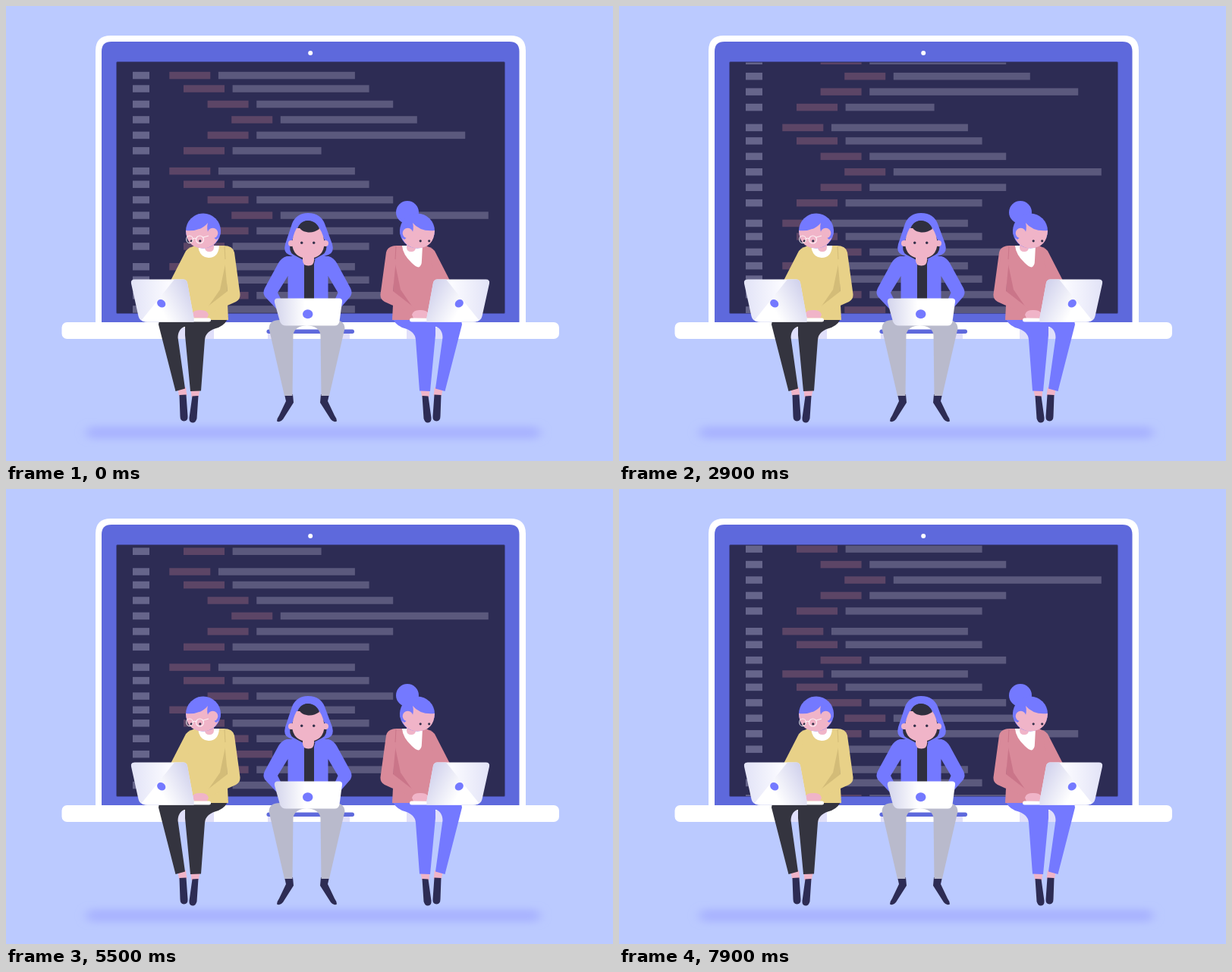
Animation of 800x600 px, one loop 8 s. Source, as an HTML page:

```html
<!DOCTYPE html>
<html lang="en">
<head>
<meta charset="utf-8">
<title>Coders</title>
<style>
  html, body { margin: 0; width: 100%; height: 100%; overflow: hidden; background: #bbcaff; }
  svg { display: block; width: 800px; height: 600px; }
</style>
</head>
<body>
<svg viewBox="0 0 800 600" xmlns="http://www.w3.org/2000/svg">
  <defs>
    <filter id="blur" x="-10%" y="-200%" width="120%" height="500%"><feGaussianBlur stdDeviation="7 5"/></filter>
    <clipPath id="screen"><rect x="146" y="74.5" width="511" height="330.5"/></clipPath>
    <linearGradient id="lidBack" x1="0" x2="1">
      <stop offset="0" stop-color="#e2e3f7"/><stop offset=".6" stop-color="#fbfbff"/><stop offset="1" stop-color="#e6e7f8"/>
    </linearGradient>
    <linearGradient id="lidShine" x1="0.1" y1="0.7" x2="1" y2="0.3">
      <stop offset=".25" stop-color="#fff"/><stop offset="1" stop-color="#cfd0ec"/>
    </linearGradient>
    <linearGradient id="lidFront" x1="0" x2="1">
      <stop offset="0" stop-color="#d3d4ec"/><stop offset=".45" stop-color="#fff"/><stop offset="1" stop-color="#fff"/>
    </linearGradient>
  </defs>

  <rect width="800" height="600" fill="#bbcaff"/>
  <rect x="106" y="554" width="598" height="17" rx="8" fill="#a9b4ff" filter="url(#blur)"/>

  <!-- big laptop -->
  <path d="M118 420V59Q118 39 138 39H665Q685 39 685 59V420Z" fill="#fff"/>
  <path d="M126 418V60Q126 47 139 47H663.500Q676.500 47 676.500 60V418Z" fill="#5e69dc"/>
  <circle cx="401.200" cy="62" r="3" fill="#fff"/>
  <rect x="145.500" y="73.500" width="512" height="332" rx="1.500" fill="#2d2c54" stroke="#454a9e" stroke-width=".8"/>
  <g clip-path="url(#screen)"><g id="code"></g></g>
  <rect x="73.500" y="417" width="655.500" height="22" rx="7" fill="#fff"/>
  <g fill="#e0dffa">
    <path d="M345 432H356V439H345ZM441 432H453V439H441Z"/>
  </g>
  <rect x="343.500" y="426.500" width="115.500" height="5.500" rx="2.700" fill="#5e69dc"/>

  <g id="left"></g>
  <g id="right" transform="translate(802 0) scale(-1 1)"></g>

  <!-- middle figure -->
  <g id="legs"></g>
  <path d="M370 330Q363 332 359 339L341 372Q338 378 341 383L356 399H440L454 383Q457 378 454 372L436 339Q432 332 425 330Z
           M371.500 356V386H362L358 378Z M424.500 356L437.500 378L434 386H424.500Z" fill="#7479ff" fill-rule="evenodd"/>
  <path d="M389 328H409L406 340V388H393V340Z" fill="#2f2f3f"/>
  <path d="M398 273C410 273 417 279 420 287L430 314Q433 325 425 328L411 333L398 337L385 333L373 328Q365 325 368 314L377 287C380 279 387 273 398 273Z" fill="#7479ff"/>
  <path d="M398 283C406 283 411 288 413 294L422 313Q424 324 417 328L404 335H392L379 328Q372 324 375 313L384 294C386 288 390 283 398 283Z" fill="#2f2f3f"/>
  <g fill="#f0b4c8">
    <path d="M391 326H406V335Q406 342.500 398.500 342.500Q391 342.500 391 335Z"/>
    <circle cx="376" cy="313" r="4"/><circle cx="421" cy="313" r="4"/>
    <path d="M383 293H413Q419 302 419.500 313Q419 332 398.500 333Q378 332 377 313Q378 302 383 293Z"/>
  </g>
  <path d="M398 283Q408 284 413 294Q404 300 396 298Q389 297 386 291Q391 283 398 283Z" fill="#2f2f3f"/>
  <g fill="#34304a"><circle cx="389.700" cy="312.300" r="1.700"/><circle cx="405.700" cy="312.300" r="1.700"/></g>
  <path d="M358 385.500H439Q443.500 385.500 443 390L439.500 416Q438.500 421.500 433 421.500H369Q363 421.500 361 416L354 391Q353 385.500 358 385.500Z" fill="url(#lidFront)"/>
  <ellipse cx="397.700" cy="406.300" rx="6.700" ry="6" fill="#7479ff"/>
</svg>
<script>
const $ = id => document.getElementById(id);
const path = (d, fill) => `<path d="${d}" fill="${fill}"/>`;
const SKIN = '#f0b4c8', BLUE = '#7479ff', NAVY = '#2d2c54';

// Seated side figure, facing left; the other one is mirrored.
function sitter(c) {
  return [
    path('M226 424H274V439H226Z', '#e0dffa'),
    // feet
    path('M226 503L237 503L238.500 514H228Z M243.500 505H256L253.500 516H244.500Z', SKIN),
    path('M228.500 513L237.500 512.500L239.500 541Q240 547 234.500 547.500Q229.500 547 229.500 541Z M245.500 514.500L253.500 514L251.500 544Q250 549.500 246 549.500Q241 549 241.500 543Z', NAVY),
    // trousers
    path('M201 420Q201 414 207 413H272V422H240Q227 423 226.500 437L236 504.500L223.500 508Z', c.legs),
    path('M236 420L240 411L293 409Q291 419 280 424Q263 428 262 440L257 507.500L243 508L236 434Z', c.legs),
    // far arm, body, near arm
    path('M254 316Q241 317 237 323L217 362V372L240 382L252 340Z', c.top),
    path('M248 316H288L293 414H240V352L243 320Z', c.top),
    path('M291 331L292 378L262 403L282 374Z', c.shade),
    path('M284 316Q299 315 301 325L308.500 380Q309 387 303 390L265 407L261 400L292 376L288 334Z', c.top),
    `<path d="M288 317L289 334" stroke="${c.shade}" fill="none"/>`,
    path(c.collar, '#fff'),
    path('M262 308H274V318Q274 324 268 324Q262 324 262 318Z', SKIN),
    // head
    c.bun ? `<circle cx="273" cy="272" r="15" fill="${BLUE}"/>` : '',
    `<circle cx="260" cy="296.500" r="23" fill="${BLUE}"/>`,
    path('M237 296Q256 298 266 286Q265 295 268 298L280 306Q274 319 260 319.500Q238 319 237 296Z', SKIN),
    path('M266 286Q264 295 267 300L277 308Q283 304 283 296Q280 284 266 286Z', BLUE),
    `<circle cx="272.500" cy="299.500" r="6.800" fill="${SKIN}"/>`,
    '<g fill="#34304a"><circle cx="244.300" cy="309.800" r="1.600"/><circle cx="255.800" cy="309.800" r="1.600"/></g>',
    c.glasses ? '<g fill="none" stroke="#fff" stroke-opacity=".8" stroke-width="1.200"><ellipse cx="242" cy="307.800" rx="4.300" ry="4.800"/><circle cx="255.500" cy="308" r="5"/><path d="M246.300 307Q248.500 305.500 250.600 307M260 305L267 303"/></g>' : '',
    // hand and small laptop
    path('M244 411Q244 401 255 401Q265 400 267 407L265 412Z', SKIN),
    '<rect x="184" y="411.500" width="86" height="5" rx="2.500" fill="#fff"/>',
    path('M169.500 360.500H233.500Q238 360.500 239 365L247.500 411V416.500H184Q176 416 174.500 409L165 366Q164 360.500 169.500 360.500Z', 'url(#lidBack)'),
    path('M222 360.500H233.500Q238 360.500 239 365L247.500 411V416.500H184Q181 416.500 178.500 414.500Z', 'url(#lidShine)'),
    `<ellipse cx="204.700" cy="392.300" rx="5.900" ry="4.900" transform="rotate(35 204.700 392.300)" fill="${BLUE}"/>`
  ].join('');
}

$('left').innerHTML = sitter({
  legs: '#34343f', top: '#e8d188', shade: '#d3bc78', glasses: true,
  collar: 'M253 316H281Q280 332 267 332Q255 332 253 316Z'
});
$('right').innerHTML = sitter({
  legs: BLUE, top: '#d98a9a', shade: '#ca7589', bun: true,
  collar: 'M253 316H280Q279 328 267 339Q262 344 258 344.500Q254 343 254 335Z'
});

const leg =
  path('M367 512L378 512L379 523L365 545Q361 550 357 547.500Q357 544 360 540L369 521Z', NAVY) +
  path('M346.500 425Q347 414 361 414H397V421Q380 422 378.500 434L377.500 514H367Z', '#b9bacc');
$('legs').innerHTML = leg + `<g transform="translate(793 0) scale(-1 1)">${leg}</g>`;

// Code listing: [indent level, bar width]
const ROWS = [[0, 180], [1, 180], [2, 180], [3, 180], [2, 275], [1, 117],
  [0, 180], [1, 180], [2, 180], [3, 274], [2, 180], [1, 180],
  [0, 180], [1, 180], [2, 180]];
const INDENT = [215.3, 234, 265.6, 297.2];
const SPEED = 19.75, LOOP = 8000, STEP = 100;

const bar = (x, y, w, fill) => `<rect x="${x}" y="${y}" width="${w}" height="9.500" fill="${fill}"/>`;
let y = 86.8, listing = '';
for (let i = 0; i < 2 * ROWS.length; i++) {
  const [level, width] = ROWS[i % ROWS.length];
  const next = ROWS[(i + 1) % ROWS.length][0];
  const x = INDENT[level];
  listing += bar(167, y, 22, '#66658b') + bar(x, y, 54, '#5c4566') + bar(x + 64.6, y, width, '#5b597d');
  y += level === 0 ? 17.5 : next > 0 ? 20.45 : level === 1 ? 26.8 : 18.2;
}
$('code').innerHTML = listing;

const start = performance.now();
function draw(now) {
  const t = Math.floor(Math.max(0, now - start) % LOOP / STEP) * STEP;
  $('code').setAttribute('transform', `translate(0 ${-SPEED * t / 1000})`);
  requestAnimationFrame(draw);
}
draw(start);
</script>
</body>
</html>
```
